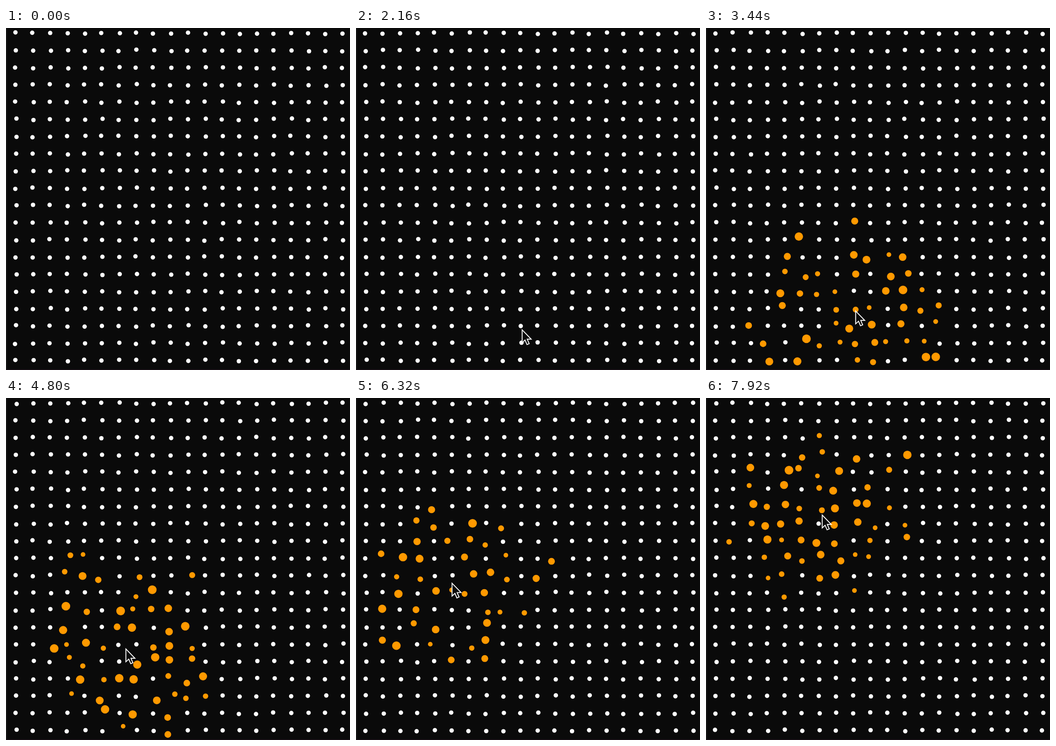
An HTML page that plays this animation: 751 by 746 pixels, repeating every 8000 ms.

```html
<!DOCTYPE html>
<html lang="en">
<head>
<meta charset="utf-8">
<title>Dot grid</title>
<style>
  html, body { margin: 0; width: 100%; height: 100%; overflow: hidden; background: #0a0a0a; }
  svg { display: block; width: 100vw; height: 100vh; }
</style>
</head>
<body>
<svg id="stage" viewBox="0 0 751 746">
  <rect width="751" height="746" fill="#0a0a0a"/>
  <rect width="2.5" height="746" fill="#171717"/>
  <rect y="744.6" width="751" height="1.4" fill="#1c1119"/>
  <g id="dots"></g>
  <path id="pointer" d="M1.2 2.4V30.4L7.5 24.6L11.8 34.6L16.6 32.5L12.3 22.8H21Z"
        fill="#0a0a0a" stroke="#fff" stroke-width="1.9"/>
</svg>
<script>
const LOOP = 8000, STEP = 80;
const COLS = 20, ROWS = 20, GAP = 37.56;
const JITTER_EVERY = 1040;
const WAKE = 2480, HOLD = 320; // first excitement; how long a dot keeps its state
const REACH = 240;

// key points of the pointer tip
const PATH = [
  { t: 640, x: 371, y: 735 },
  { t: 800, x: 372, y: 667 },
  { t: 1200, x: 373, y: 660 },
  { t: 1600, x: 373, y: 660 },
  { t: 2160, x: 361.5, y: 656 },
  { t: 2400, x: 361.5, y: 656 },
  { t: 3440, x: 325.5, y: 615 },
  { t: 4800, x: 260.5, y: 545 },
  { t: 5440, x: 214.5, y: 461 },
  { t: 7040, x: 203.5, y: 353 },
  { t: 7920, x: 252.5, y: 253 }
];

const pointer = document.getElementById('pointer');
const layer = document.getElementById('dots');

const clamp = v => Math.min(1, Math.max(0, v));
const mix = (a, b, k) => a + (b - a) * k;

// small seeded generator, numbers in 0..1
function random(seed) {
  return () => {
    seed = (seed + 0x6d2b79f5) | 0;
    let h = Math.imul(seed ^ (seed >>> 15), 1 | seed);
    h = (h + Math.imul(h ^ (h >>> 7), 61 | h)) ^ h;
    return ((h ^ (h >>> 14)) >>> 0) / 2 ** 32;
  };
}

function tipAt(t) {
  const next = PATH.findIndex(p => p.t >= t);
  const i = next < 0 ? PATH.length - 1 : Math.max(1, next);
  const a = PATH[i - 1], b = PATH[i];
  const k = clamp((t - a.t) / (b.t - a.t));
  return { x: mix(a.x, b.x, k), y: mix(a.y, b.y, k) };
}

const dots = Array.from({ length: COLS * ROWS }, (_, id) => {
  const el = document.createElementNS('http://www.w3.org/2000/svg', 'circle');
  layer.append(el);
  return {
    id, el,
    x: 21.5 + (id % COLS) * GAP,
    y: 11.5 + Math.floor(id / COLS) * GAP,
    start: WAKE + STEP * Math.floor(random(id)() * HOLD / STEP)
  };
});

function place({ id, el, x, y, start }, t) {
  // near the pointer a dot may turn orange, larger and displaced
  const turn = Math.floor((t - start) / HOLD);
  let rand = random(id * 1009 + turn * 7919);
  let hot = false;
  if (turn >= 0) {
    const tip = tipAt(start + turn * HOLD);
    const dist = Math.hypot(x - tip.x, y - tip.y);
    hot = rand() < 0.7 * clamp((REACH - dist) / 120);
  }
  if (!hot) rand = random(id * 1013 + 500009 * Math.floor((t + 640) / JITTER_EVERY));

  const shift = hot ? 10 : 1.9;
  el.setAttribute('cx', x + mix(-shift, shift, rand()));
  el.setAttribute('cy', y + mix(-shift, shift, rand()));
  el.setAttribute('r', hot ? mix(4.9, 9.5, rand()) : 4.8);
  el.setAttribute('fill', hot ? '#ff9900' : '#fff');
}

function render(t) {
  dots.forEach(dot => place(dot, t));
  const { x, y } = tipAt(t);
  pointer.setAttribute('transform', `translate(${x} ${y})`);
  pointer.setAttribute('visibility', t < PATH[0].t ? 'hidden' : 'visible');
}

let shown = -1;
function frame(now) {
  const t = Math.floor((now % LOOP) / STEP) * STEP;
  if (t !== shown) render(shown = t);
  requestAnimationFrame(frame);
}
render(0);
requestAnimationFrame(frame);
</script>
</body>
</html>
```
